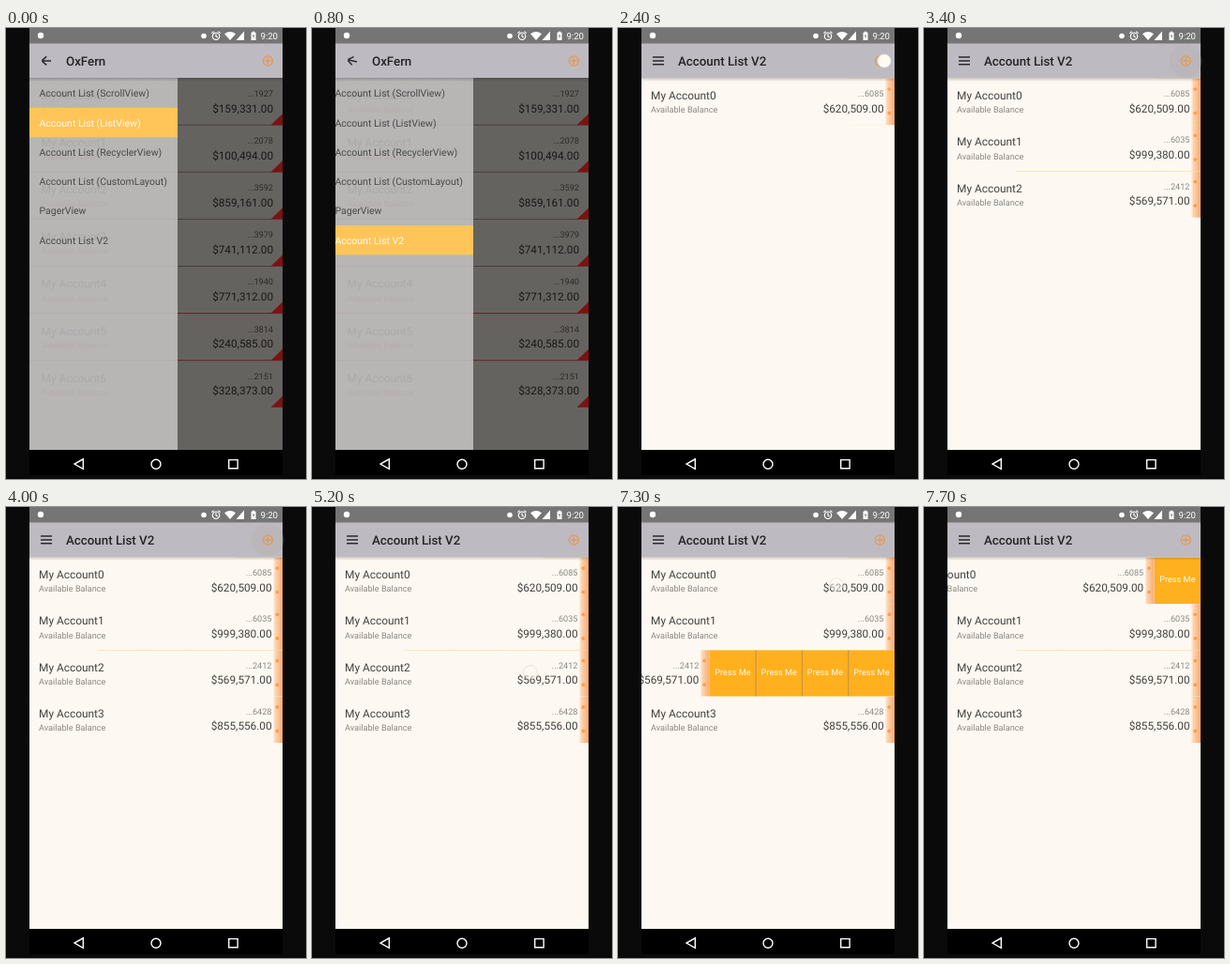
An HTML page for the animation above (8 s loop, 320 by 480 pixels).

```html
<!DOCTYPE html>
<html lang="en">
<head>
<meta charset="utf-8">
<title>Account list</title>
<style>
  html, body { margin: 0; width: 100%; height: 100%; overflow: hidden; background: #0a0a0a; }
  svg { display: block; width: 100vw; height: 100vh; }
  text { font-family: Roboto, "Open Sans", sans-serif; text-rendering: geometricPrecision; }
  .title { font-size: 13.3px; font-weight: 500; fill: #242326; }
  .name, .amount { font-size: 11.9px; fill: #44423f; }
  .amount { font-size: 11.75px; }
  .sub, .num { font-size: 9.15px; fill: #8b8885; }
  .end { text-anchor: end; }
  .old .name, .old .amount { fill: #191818; }
  .old .num { fill: #2c2a29; }
  .old .sub { fill: #5c2a2a; }
  .item { font-size: 10.5px; fill: #4a494a; }
  .item.on { fill: #fffaf0; }
  .press { font-size: 9.2px; fill: #fff8e6; text-anchor: middle; }
</style>
</head>
<body>
<svg viewBox="0 0 320 480">
  <defs>
    <clipPath id="page"><rect x="25" y="53" width="270" height="396"/></clipPath>
    <linearGradient id="edge">
      <stop offset="0" stop-color="#fdebd9"/>
      <stop offset=".25" stop-color="#fcd2ac"/>
      <stop offset="1" stop-color="#f9ab6c"/>
    </linearGradient>
    <linearGradient id="shade" x2="0" y2="1">
      <stop offset="0" stop-opacity=".2"/>
      <stop offset="1" stop-opacity="0"/>
    </linearGradient>
  </defs>
  <rect width="320" height="480" fill="#0a0a0a"/>
  <rect x="25" y="448" width="270" height="28" fill="#000"/>
  <g clip-path="url(#page)">
    <rect x="25" y="53" width="270" height="396" fill="#fdf8f1"/>
    <g id="rows"></g>
    <rect id="scrim" x="25" y="53" width="270" height="396"/>
    <g id="old" class="old"><rect x="25" y="53" width="270" height="396" fill="#656360"/></g>
    <g id="drawer"><rect x="25" y="53" width="158" height="396" fill="#c8c7c7" fill-opacity=".83"/></g>
    <rect x="25" y="53" width="270" height="4" fill="url(#shade)"/>
  </g>

  <rect x="25" width="270" height="17" fill="#757575"/>
  <rect x="25" y="16.5" width="270" height="36.5" fill="#bebac1"/>
  <g id="icon" fill="none" stroke="#2a292b" stroke-width="1.5"><path/></g>
  <text id="title" class="title" x="64" y="40"></text>
  <circle id="ripple" cx="279" cy="35" fill="#b2aaa6"/>
  <g fill="none" stroke="#e69a50" stroke-width="1.3">
    <circle cx="279.3" cy="35" r="5.1"/>
    <path d="M279.3 31.5v7M275.8 35h7"/>
  </g>

  <g fill="#fff">
    <circle cx="37" cy="8" r="3.2"/>
    <circle cx="211" cy="8.5" r="2.8"/>
    <path d="M233 6.2Q239 1.8 245 6.2L239 13zM254 3.5V13H245.5z"/>
    <path d="M262.7 3.8h2.6v1h1.2v8.2h-5v-8.2h1.2z"/>
    <path d="M264.4 6l-1.5 3h1l-.3 2.5 1.6-3.3h-1z" fill="#757575"/>
    <text x="271.5" y="12" font-size="9.6">9:20</text>
  </g>
  <g fill="none" stroke="#fff" stroke-width="1.2">
    <circle cx="224" cy="8.7" r="3.7"/>
    <path d="M224 6.3v2.6l1.8 1M219.4 5.6l2.2-2M228.6 5.6l-2.2-2"/>
  </g>
  <g fill="none" stroke="#fff" stroke-width="1.4">
    <path d="M82.3 458.8v10.6l-9.3-5.3zM237.7 459.6h9.4v9.2h-9.4z"/>
    <circle cx="160" cy="464.2" r="5"/>
  </g>
  <circle id="touch" r="7.3" fill="#fffaf3" stroke="#c9c5c0" stroke-width=".7"/>
</svg>
<script>
const LOOP = 8000, STEP = 100, ROW = 49.3, OLD_ROW = 50.1, ITEM = 31.3, TOP = 53.8;
const $ = id => document.getElementById(id);

function add(parent, tag, attrs, text) {
  const el = document.createElementNS("http://www.w3.org/2000/svg", tag);
  for (const k in attrs) el.setAttribute(k, attrs[k]);
  if (text) el.textContent = text;
  return parent.appendChild(el);
}
const set = (el, key, value) => el.setAttribute(key, value);
const label = (parent, cls, x, y, text) => add(parent, "text", { class: cls, x, y }, text);

function account(g, i, x, right, y, nameY, subY, num, amount) {
  label(g, "name", x, y + nameY, "My Account" + i);
  label(g, "sub", x, y + subY, "Available Balance");
  label(g, "num end", right, y + 19.2, "..." + num);
  label(g, "amount end", right, y + 35.7, amount);
}

// Dimmed list behind the drawer
[["1927", "$159,331.00"], ["2078", "$100,494.00"], ["3592", "$859,161.00"], ["3979", "$741,112.00"],
 ["1940", "$771,312.00"], ["3814", "$240,585.00"], ["2151", "$328,373.00"]].forEach(([num, amount], i) => {
  const y = TOP + OLD_ROW * i, end = y + OLD_ROW - .7;
  account($("old"), i, 37.5, 285, y, 22.2, 36.3, num, amount);
  if (i < 6) add($("old"), "path", { d: `M25 ${end}H295`, stroke: i > 3 ? "#621c1c" : "#453a39", "stroke-width": .9 });
  add($("old"), "path", { d: `M295 ${end - 12}V${end}H282.5z`, fill: "#7c1212" });
});

// Drawer entries
const band = add($("drawer"), "rect", { x: 25, width: 158, height: ITEM, fill: "#ffc559" });
const items = ["Account List (ScrollView)", "Account List (ListView)", "Account List (RecyclerView)",
  "Account List (CustomLayout)", "PagerView", "Account List V2"]
  .map((s, i) => label($("drawer"), "item", 35.5, TOP + ITEM * i + 19.4, s));

// Swipeable rows with buttons underneath
const rows = [["6085", "$620,509.00", 1], ["6035", "$999,380.00", 0], ["2412", "$569,571.00", 4], ["6428", "$855,556.00", 0]]
  .map(([num, amount, count], i) => {
    const y = TOP + ROW * i, g = add($("rows"), "g", {});
    for (let b = 0; b < count; b++) {
      const x = 295 - ROW * (count - b);
      add(g, "rect", { x, y, width: ROW, height: ROW, fill: "#ffb01f" });
      if (b) add(g, "path", { d: `M${x} ${y}v${ROW}`, stroke: "#b98b3c", "stroke-width": .9 });
      label(g, "press", x + ROW / 2, y + 26.2, "Press Me");
    }
    const face = add(g, "g", {});
    add(face, "rect", { x: 25, y, width: 270, height: ROW + .3, fill: "#fdf8f1" });
    account(face, i, 35, 283.5, y, 22.3, 36.4, num, amount);
    add(face, "rect", { x: 285.3, y, width: 9.7, height: ROW, fill: "url(#edge)" });
    for (const dy of [11.3, 36.8]) add(face, "circle", { cx: 289.3, cy: y + dy, r: 1.9, fill: "#f6a052" });
    return { g, face };
  });

// Value from [time, value] keys, straight between keys
function track(t, keys) {
  let [t0, v0] = keys[0];
  for (const [t1, v1] of keys) {
    if (t < t1) return t <= t0 ? v0 : v0 + (v1 - v0) * (t - t0) / (t1 - t0);
    t0 = t1; v0 = v1;
  }
  return v0;
}

const born = [0, 2500, 3100, 3800];
const slide = [[700, 0], [800, 11], [900, 64], [1000, 128], [1100, 158]];
const openThird = [[5200, 0], [5300, 24], [5400, 98], [5500, 172], [5600, 197.2],
  [7300, 197.2], [7400, 168], [7500, 90], [7600, 24], [7700, 0]];
const openFirst = [[7300, 0], [7400, 12], [7500, 33], [7600, 45], [7700, 49.3]];
const ripples = [[2400, 800], [3000, 500], [3700, 400]];
// from, until, x, y, speed in px per 100 ms, opacity
const touches = [[500, 700, 122, 227, 0, .5], [2400, 2500, 284, 35, 0, 1], [3000, 3100, 284, 35, 0, .9],
  [3700, 3800, 284, 35, 0, .9], [5200, 5500, 233, 176, -48, .55], [7300, 7600, 233, 83, -16, .5]];

function menuIcon(p) {
  const mix = (a, b) => a + (b - a) * p;
  const x1 = mix(-6, -4.6), x2 = mix(6, .2), a = mix(3.8, .3), b = mix(3.8, 4.5);
  set($("icon").firstElementChild, "d",
    `M${mix(-6, -4.8)} 0H${mix(6, 5)}M${x1} ${-a}L${x2} ${-b}M${x1} ${a}L${x2} ${b}`);
  set($("icon"), "transform", `translate(43 34.9) rotate(${(1 - p) * 180})`);
}

function draw(t) {
  const shift = track(t, slide), open = 1 - shift / 158, chosen = t < 600 ? 1 : 5;
  set($("drawer"), "transform", `translate(${-shift} 0)`);
  set($("drawer"), "visibility", open > 0 ? "visible" : "hidden");
  set($("old"), "visibility", t < 900 ? "visible" : "hidden");
  set($("scrim"), "opacity", .6 * open);
  set(band, "y", TOP + ITEM * chosen - .2);
  items.forEach((el, i) => el.classList.toggle("on", i === chosen));
  $("title").textContent = t < 1100 ? "OxFern" : "Account List V2";
  menuIcon(open);

  rows.forEach(({ g, face }, i) => {
    set(g, "opacity", i ? track(t, [[born[i], 0], [born[i] + 200, 1]]) : 1);
    const x = i === 0 ? track(t, openFirst) : i === 2 ? track(t, openThird) : 0;
    set(face, "transform", `translate(${-x} 0)`);
  });

  const wave = ripples.find(([at, len]) => t > at && t < at + len && !ripples.some(([b]) => b > at && b <= t));
  const k = wave ? (t - wave[0]) / wave[1] : 0;
  set($("ripple"), "r", Math.min(17.5, 8 + 22 * k));
  set($("ripple"), "opacity", wave ? .65 * (1 - k) + .1 : 0);

  const touch = touches.find(([a, b]) => t >= a && t < b);
  set($("touch"), "opacity", touch ? touch[5] : 0);
  if (touch) {
    set($("touch"), "cx", touch[2] + touch[4] * (t - touch[0]) / 100);
    set($("touch"), "cy", touch[3]);
  }
}

const start = performance.now();
function tick() {
  const t = (performance.now() - start) % LOOP;
  draw(Math.floor(t / STEP) * STEP);
  requestAnimationFrame(tick);
}
tick();
</script>
</body>
</html>
```
